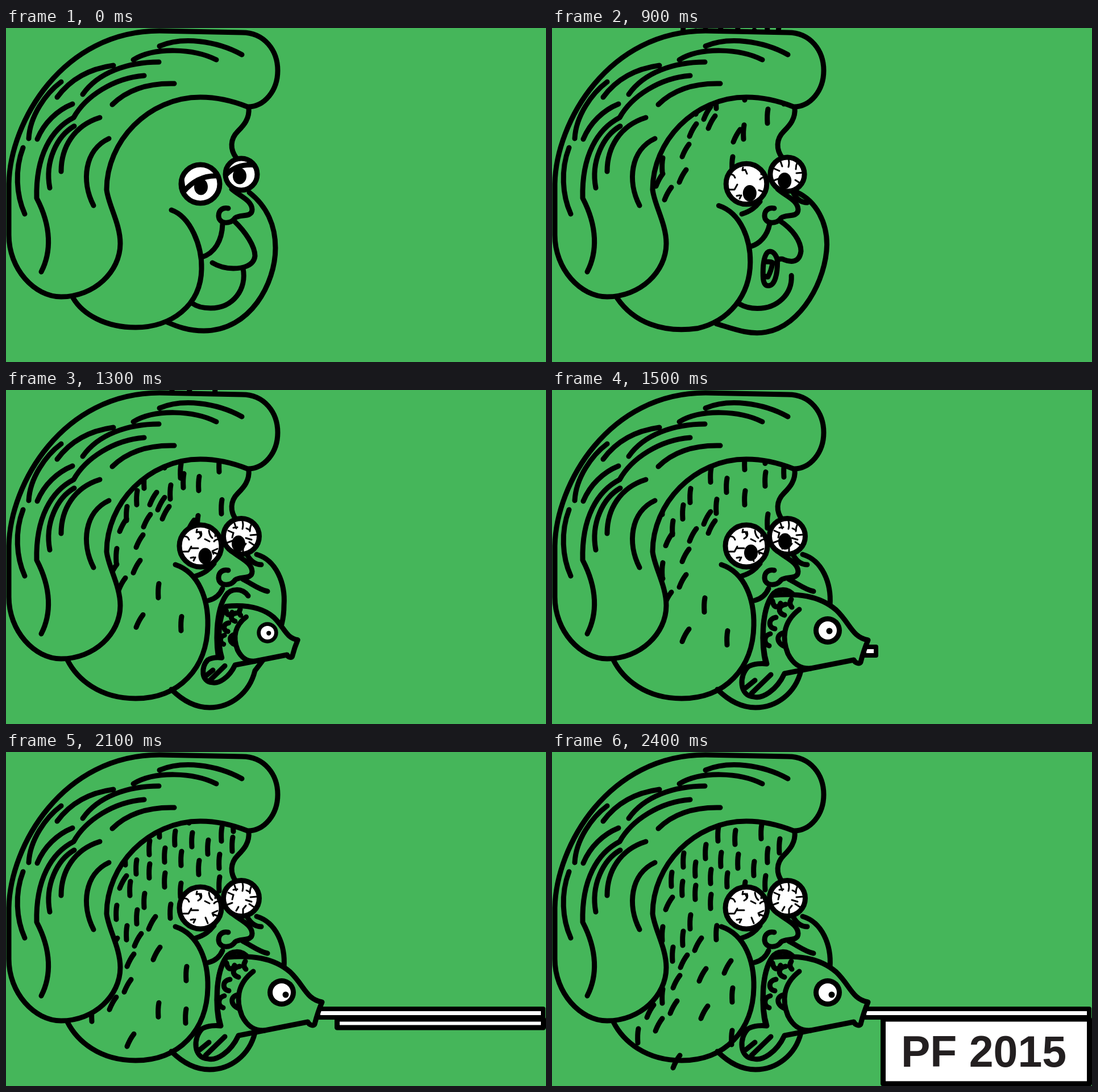
An HTML page with a canvas that plays this animation: 950x589 px, repeating every 4.4 s.

```html
<!DOCTYPE html>
<html lang="en">
<head>
<meta charset="utf-8">
<title>PF 2015</title>
<style>
html, body { margin: 0; width: 100%; height: 100%; overflow: hidden; background: #45b65a; }
canvas { display: block; }
</style>
</head>
<body>
<canvas id="stage" width="950" height="589"></canvas>
<script>
const ctx = document.getElementById('stage').getContext('2d');
const GREEN = '#45b65a', WHITE = '#fff', BLACK = '#000';
const LOOP = 4400, STEP = 100, LAST = 24, FALL = 12.6;

const hair = 'M5 365V275C7 165 100 5 270 5L415 8C455 8 478 40 478 75C478 110 455 139 425 139C400 129 372 122 342 122C250 122 177 200 177 285C180 312 201 345 201 380C201 430 155 474 97 474C50 474 5 425 5 365Z';
const strands = `M270 32C310 15 370 22 415 47M224 56C262 33 330 36 370 56
M90 122C112 92 145 72 189 66M135 117C162 78 215 60 269 60M40 195C42 155 70 115 97 95
M55 196C67 167 90 145 117 134M243 84C190 88 140 120 119 158C80 178 52 225 54 300C80 350 80 395 62 430
M187 135C215 107 255 97 296 98M77 282C68 235 90 190 120 173M97 253C97 210 120 172 165 158
M30 211C15 250 18 295 33 328M181 195C138 215 132 270 154 313`;
const forehead = 'M427 140C429 160 418 172 408 182C394 196 394 214 405 229';
const nose = 'M397 284C410 296 432 303 433 320C433 335 412 328 403 335C395 347 374 346 374 331C374 321 382 316 391 318';

// Each face line as [calm, scared]
const faceLines = [
  ['M291 321C325 333 345 385 344 425C343 490 290 528 228 528C175 528 135 505 118 476',
   'M295 308C340 322 352 370 352 405C352 460 325 510 274 531C210 545 150 530 112 476'],
  ['M428 290C460 315 474 350 474 388C474 450 430 534 348 534C320 534 300 526 284 519',
   'M432 289C470 300 490 340 490 378C488 440 445 520 395 538C365 547 330 533 292 523'],
  ['M381 346C380 375 367 397 345 404', 'M384 346C378 360 365 370 352 373'],
  ['M417 424C424 460 400 494 360 494C345 494 335 491 327 485',
   'M424 445C422 475 395 495 362 495C348 495 338 491 330 487'],
];
const lips = [
  'M401 340C422 360 438 385 438 402C436 420 415 424 400 424C385 424 373 420 363 414',
  'M401 340C422 360 438 385 438 402C434 420 412 422 400 424C390 425 383 427 379 429',
  'M401 340C425 352 438 370 438 388C436 412 424 408 408 396C407 395 407 395 406 394',
];
const wrinkles = 'M334 328C350 323 358 316 366 306M425 292C432 304 440 308 449 308';
const openMouth = 'M383 374C395 374 405 390 405 405C405 440 398 475 378 475C362 475 362 450 363 425C364 400 370 374 383 374ZM368 402C375 407 383 402 391 407C388 425 382 440 377 449C372 449 368 448 366 445';
const fullFace = `M298 308C340 322 356 370 355 415C354 490 305 544 228 544C165 544 125 510 108 476
M441 290C475 300 492 340 489 380C489 430 465 460 438 495C428 535 395 560 358 560C330 560 308 545 291 528
M381 350C376 362 368 368 357 371M417 334C430 340 445 352 460 355
M376 483C368 450 368 390 387 362C395 350 415 348 426 363`;
const fishBody = 'M388 362C430 358 470 362 500 388C525 412 528 436 556 441C550 455 546 468 543 480C540 484 533 481 531 476L455 491L409 500C395 530 370 545 355 541C330 540 328 505 345 488C355 482 370 482 378 483C368 450 368 390 388 362Z';
const fishLines = `M435 387C405 410 405 440 415 465C425 485 438 492 455 491
M341 525L357 512M351 535L385 502M388 372C390 386 400 384 402 376M421 369q-5 8 1 14
M411 378c-13 2-15 15-2 19M394 401c-14 2-14 18-2 20M384 430c-12 3-12 18-2 21M409 428c-15 2-15 18 0 24`;

const eyes = [
  { x: 342, y: 275, r: 34, grow: 3, lid: 'M312 289C330 268 350 259 374 261V200H300Z',
    look: [[343, 280], [351, 299], [350, 287], [341, 243], [341, 213]],
    veins: 'M336 246l-1 5 5-1 3 7M314 258q6 0 8 6M369 249l-1 9M376 263q-7 0-10 4M312 285h9l5-9M330 301l3-6M372 289l-8-3M325 296l5-1',
    moreVeins: 'M343 250q3 8-5 12M357 248q1 9 6 13M326 279h12M358 267l-8-4M372 280l-9 4 2 5M355 302l-4-10' },
  { x: 414, y: 258, r: 28, grow: 3.5, lid: 'M386 260C400 244 420 239 443 242V190H380Z',
    look: [[411, 261], [408, 275], [410, 267], [410, 231], [410, 203]],
    veins: 'M402 235l3 9M416 231q2 6 0 14M432 236q-3 6-3 13M391 248l9 4M442 255l-12 1M390 269l8-3M437 274l-9-6',
    moreVeins: 'M400 252l-2 8M407 242l-7 1M429 247l-6-3M417 286v-9l5-6M432 264l-10-3M405 280l4-7' },
];
const lookSteps = [6, 11, 15, 19, 21];

// Sweat: [x, resting y, first step, last step]
const straightDrops = [
  [292, 144], [322, 150], [368, 140], [400, 165], [270, 175], [297, 189], [327, 192], [379, 182],
  [231, 190], [355, 205], [252, 206], [279, 219], [308, 225], [375, 230], [210, 224], [229, 240],
  [252, 247], [279, 263], [243, 299], [230, 328], [194, 320], [212, 356], [289, 318], [317, 428],
  [151, 500], [316, 503, 20], [218, 278, 0, 23], [339, 241], [375, 270], [307, 281], [398, 200, 0, 23],
  [268, 492, 12, 23], [308, 550, 12, 19], [339, 303], [337, 372], [379, 344], [408, 310, 0, 12],
  [408, 254, 0, 17], [312, 298, 0, 13], [194, 430]];
const slantedDrops = [
  [257, 339], [232, 369], [219, 405], [206, 267], [265, 355, 0, 17], [265, 393, 18], [309, 379],
  [173, 457], [214, 450], [188, 481], [268, 459, 22], [219, 546], [190, 377], [243, 330, 0, 14]];

const clamp = v => Math.max(0, Math.min(1, v));
const lerp = (a, b, t) => a + (b - a) * t;

function mixPath(a, b, t) {
  const target = b.match(/[\d.]+/g);
  let i = 0;
  return a.replace(/[\d.]+/g, n => lerp(+n, +target[i++], t));
}

function draw(path, fill, width = 9) {
  const shape = new Path2D(path);
  if (fill) { ctx.fillStyle = fill; ctx.fill(shape); }
  ctx.lineWidth = width;
  ctx.stroke(shape);
}

function ellipse(x, y, rx, ry, fill) {
  ctx.beginPath();
  ctx.ellipse(x, y, rx, ry, 0, 0, 7);
  ctx.fillStyle = fill;
  ctx.fill();
}

function scaledAbout(x, y, s, paint) {
  ctx.save();
  ctx.translate(x, y);
  ctx.scale(s, s);
  ctx.translate(-x, -y);
  paint();
  ctx.restore();
}

function drawDrops(drops, step, shape, drift) {
  for (const [x0, restY, from = 0, to = LAST] of drops) {
    const x = x0 + drift, y = restY - (LAST - step) * FALL;
    const behindEyes = y > 246 && (x > 325 || x > 298 && y < 345);
    if (step < from || step > to || behindEyes || (step < 12 && y > 310)) continue;
    draw(`M${x} ${y}${shape}`);
  }
}

function gaze(look, step) {
  if (step <= lookSteps[0]) return look[0];
  const i = lookSteps.findIndex(s => step <= s);
  if (i < 0) return look[look.length - 1];
  const t = (step - lookSteps[i - 1]) / (lookSteps[i] - lookSteps[i - 1]);
  return look[i].map((v, axis) => lerp(look[i - 1][axis], v, t));
}

function drawEye(eye, step, fear) {
  const r = eye.r + eye.grow * fear;
  ctx.save();
  ellipse(eye.x, eye.y, r, r, WHITE);
  ctx.clip();
  if (step > 7) draw(eye.veins, null, 3);
  if (step > 11) draw(eye.moreVeins, null, 3);
  ellipse(...gaze(eye.look, step), 12, 14.5, BLACK);
  if (step < 5) {
    ctx.translate(0, -step * 10);
    draw(eye.lid, WHITE);
  }
  ctx.restore();
  ctx.beginPath();
  ctx.arc(eye.x, eye.y, r, 0, 7);
  ctx.lineWidth = 9;
  ctx.stroke();
}

function drawFace(step, fear) {
  draw(forehead);
  draw(nose);
  if (step > 8) draw(wrinkles);
  if (step > 11) return draw(fullFace);
  for (const [calm, scared] of faceLines) draw(mixPath(calm, scared, fear));
  draw(fear ? mixPath(lips[1], lips[2], fear) : mixPath(lips[0], lips[1], clamp(step / 5)));
  if (fear) scaledAbout(384, 424, fear, () => draw(openMouth, GREEN, 9 / fear));
}

function box(x, y, w, h, width) {
  ctx.beginPath();
  ctx.rect(x, y, w, h);
  ctx.fillStyle = WHITE;
  ctx.fill();
  ctx.lineWidth = width;
  ctx.stroke();
}

function drawBanner(step) {
  const bottom = 486 + 33 * (step - 21);
  box(582.5, 471, 363, bottom - 471, 9);
  ctx.save();
  ctx.beginPath();
  ctx.rect(587, 472, 354, bottom - 476);
  ctx.clip();
  ctx.fillStyle = '#231f20';
  ctx.font = 'bold 77px "Liberation Sans", Arial, sans-serif';
  ctx.fillText('PF 2015', 614, bottom - 30);
  ctx.restore();
}

function drawRod(step) {
  const end = step < 19 ? 574 + 50 * (step - 15) : Math.min(949, 724 + 88 * (step - 18));
  box(549, 453, end - 553, 15, 8);
}

function drawFish(step) {
  const size = clamp(0.5 + 0.25 * (step - 12));
  scaledAbout(385, 440, size, () => {
    draw(fishBody, GREEN, 9 / size);
    draw(fishLines, null, 9 / size);
    ellipse(485, 424, 25, 25, BLACK);
    ellipse(485, 424, 16, 16, WHITE);
    const shift = clamp((step - 15) / 4);
    ellipse(488 + 4 * shift, 425 + 3 * shift, 5.5, 5.5, BLACK);
  });
}

function render(step) {
  const fear = clamp((step - 6) / 5);
  ctx.fillStyle = GREEN;
  ctx.fillRect(0, 0, 950, 589);
  ctx.strokeStyle = BLACK;
  ctx.lineCap = ctx.lineJoin = 'round';
  if (step > 6) {
    drawDrops(straightDrops, step, 'm1-12q-2 10-1 25', 0);
    drawDrops(slantedDrops, step, 'm6-11q-7 9-12 22', step < 17 ? 16 : 0);
  }
  draw(hair, GREEN);
  draw(strands);
  drawFace(step, fear);
  for (const eye of eyes) drawEye(eye, step, fear);
  if (step > 20) drawBanner(step);
  if (step > 14) drawRod(step);
  if (step > 11) drawFish(step);
}

function tick() {
  render(Math.min(LAST, Math.floor(performance.now() % LOOP / STEP)));
  requestAnimationFrame(tick);
}
tick();
</script>
</body>
</html>
```
